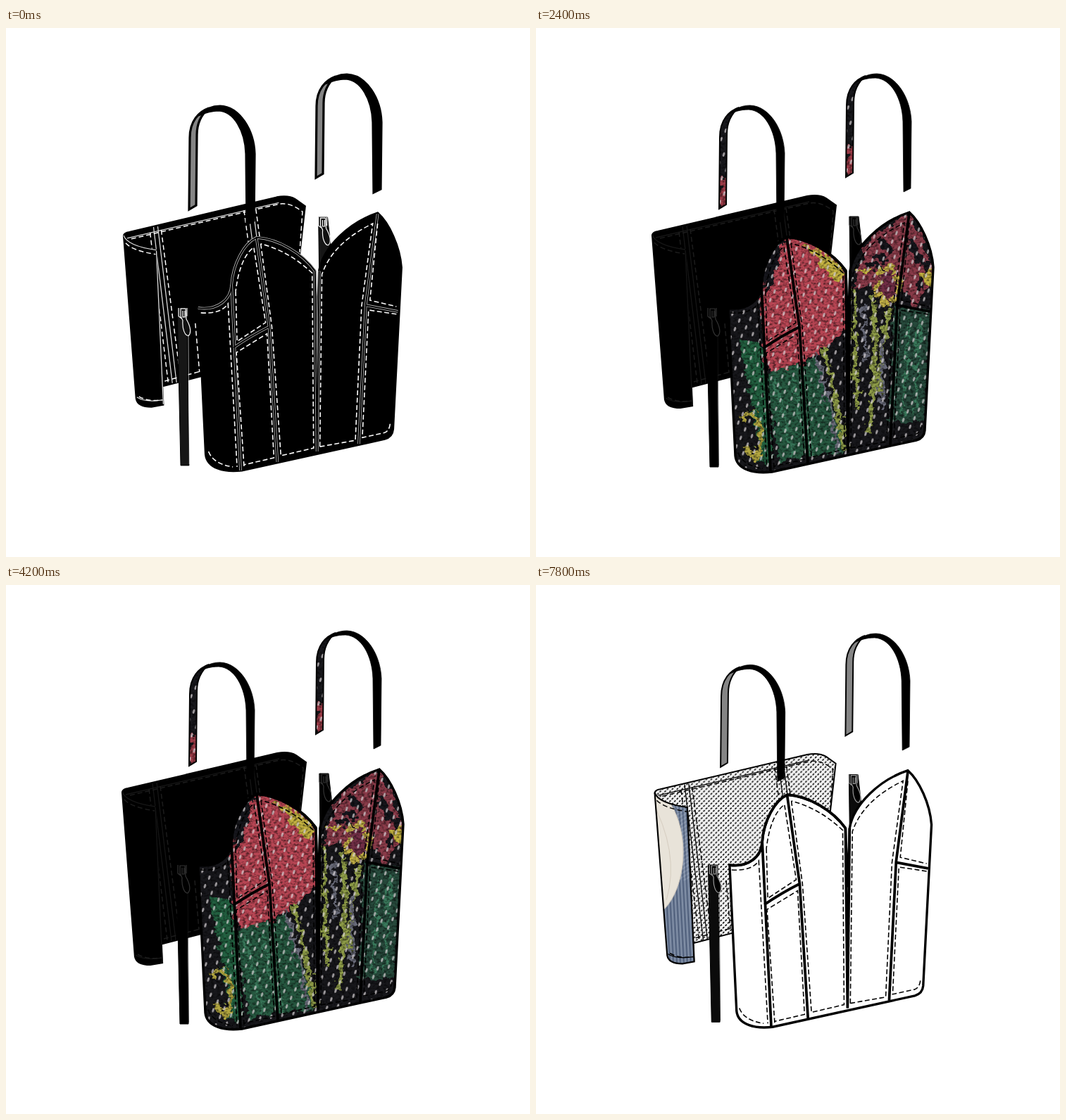
Write an HTML page that moves like this. It is 744 px wide and 752 px high and loops after 8 s.

```html
<!DOCTYPE html>
<html lang="en">
<head>
<meta charset="utf-8">
<title>Bag fabrics</title>
<style>
html, body { margin: 0; width: 100%; height: 100%; overflow: hidden; background: #fff; }
svg { display: block; width: 100vw; height: 100vh; }

/* Each scene shows for its share of the 8 s loop, offset by a negative delay. */
.scene { visibility: hidden; animation: show 8s step-end infinite; animation-delay: calc(var(--at) * 1ms - 8s); }
.long { animation-name: show-long; }
.short { animation-name: show-short; }
@keyframes show { 0% { visibility: visible } 7.5% { visibility: hidden } }
@keyframes show-long { 0% { visibility: visible } 15% { visibility: hidden } }
@keyframes show-short { 0% { visibility: visible } 2.5% { visibility: hidden } }

/* Looks */
.scene {
  --front: #fff; --back: #000; --side: #000; --strap: #858585;
  --stitch: #000; --edge: #000; --back-stitch: #484848; --back-edge: #333; --back-line: #000;
  --pull: #111; --pull-line: #fff; --tape: #0b0b0b; --strap-line: 1;
  --body-move: none; --strap-move: none;
}
.black {
  --front: #000; --stitch: #fff; --edge: #aaa; --back-stitch: #fff; --back-edge: #ddd; --strap-line: 4;
  --tape: #161616; --body-move: matrix(.988, 0, 0, .991, 4, 3.5); --strap-move: translate(0px, 1px);
}
.plain {
  --back: #fff; --side: #fff; --back-stitch: #000; --back-edge: #000;
  --pull: #000; --pull-line: #999;
  --body-move: matrix(.985, 0, 0, .988, 6, 4.8); --strap-move: matrix(.985, 0, 0, .988, 6, 4.8);
}
.dotted { --back: url(#dots); }
.floral { --front: url(#floral); --strap: url(#floral); --back-stitch: #1c1c1c; --back-edge: #161616; --pull: #000; --pull-line: #333; --tape: #000; }
.toile { --front: url(#toile); --strap: url(#strap-blue); --back-stitch: #555; --pull-line: #778; }
.knit { --front: url(#knit); }
.wave { --front: url(#wave); }

.body { transform: var(--body-move); }
.straps { transform: var(--strap-move); }
.front { fill: var(--front); stroke: #000; stroke-width: 3.4; }
.edge { fill: none; stroke: var(--edge); stroke-width: 3.8; }
.core { fill: none; stroke: #000; stroke-width: 2; }
.stitch { fill: none; stroke: var(--stitch); stroke-width: 1.6; stroke-dasharray: 7 3.6; }
.back { fill: var(--back); stroke: var(--back-line); stroke-width: 2; }
.side { fill: var(--side); stroke: var(--back-line); stroke-width: 2.2; }
.back-seam { fill: none; stroke: var(--back-edge); stroke-width: 1.3; }
.back-stitch { fill: none; stroke: var(--back-stitch); stroke-width: 1.5; stroke-dasharray: 7 4; }
.strap-face { fill: var(--strap); stroke: #000; stroke-width: calc(1.6px + var(--strap-line) * .4px); }
.strap-top { stroke: #000; stroke-width: calc(var(--strap-line) * .8px); }
.tape { fill: var(--tape); stroke: #000; }
.pull { fill: var(--pull); stroke: var(--pull-line); stroke-width: 1.2; }
</style>
</head>
<body>
<svg viewBox="0 0 744 752" preserveAspectRatio="none">
<defs>
  <filter id="rough" x="-10%" y="-10%" width="120%" height="120%">
    <feTurbulence type="fractalNoise" baseFrequency=".09" numOctaves="3" seed="4"/>
    <feDisplacementMap in="SourceGraphic" scale="20" xChannelSelector="R" yChannelSelector="G"/>
  </filter>
  <filter id="soft"><feGaussianBlur stdDeviation="7"/></filter>
  <filter id="grain" x="0" y="0" width="100%" height="100%">
    <feTurbulence type="fractalNoise" baseFrequency=".22 .32" numOctaves="2" seed="9"/>
    <feColorMatrix values="0 0 0 0 0  0 0 0 0 0  0 0 0 0 0  3 0 0 0 -1.25"/>
  </filter>

  <pattern id="dots" width="7" height="7" patternUnits="userSpaceOnUse">
    <path d="M0 0H7V7H0Z" fill="#f3f3f3"/>
    <path d="M.6 2.6L2.8.6M4.1 6.1L6.3 4.1" stroke="#000" stroke-width="1.5"/>
  </pattern>
  <pattern id="mesh" width="4" height="4" patternUnits="userSpaceOnUse">
    <path d="M0 0h1.5v1.5H0zM2 2h1.5v1.5H2z" fill="#2a2a3a" opacity=".38"/>
  </pattern>
  <pattern id="specks" width="16" height="22" patternUnits="userSpaceOnUse" patternTransform="rotate(-9)">
    <g fill="#d6d0d3" opacity=".75">
      <ellipse cx="4" cy="5" rx="1.5" ry="3.2" transform="rotate(24 4 5)"/>
      <ellipse cx="12" cy="16" rx="1.5" ry="3.2" transform="rotate(24 12 16)"/>
    </g>
  </pattern>
  <pattern id="loops" width="7" height="6" patternUnits="userSpaceOnUse" patternTransform="rotate(-4)">
    <path d="M0 1L3.5 4L7 1" fill="none" stroke="#222" stroke-width="1" opacity=".22"/>
  </pattern>
  <pattern id="rules" width="5" height="5" patternUnits="userSpaceOnUse" patternTransform="rotate(-3)">
    <path d="M1 0V5" stroke="#aab5c6" stroke-width="1.1"/>
    <path d="M3.6 0V5" stroke="#3d4c69" stroke-width="1"/>
  </pattern>
  <pattern id="slants" width="5" height="5" patternUnits="userSpaceOnUse" patternTransform="rotate(58)">
    <path d="M1 0V5" stroke="#9eabc0" stroke-width="1"/>
  </pattern>

  <linearGradient id="yarn" gradientUnits="userSpaceOnUse" x1="0" y1="304" x2="22" y2="544" spreadMethod="repeat">
    <stop offset="0" stop-color="#8fb9d5"/><stop offset=".06" stop-color="#8fb9d5"/>
    <stop offset=".09" stop-color="#5d5b64"/><stop offset=".21" stop-color="#66616a"/>
    <stop offset=".25" stop-color="#c0575b"/><stop offset=".38" stop-color="#c66062"/>
    <stop offset=".41" stop-color="#65606a"/><stop offset=".46" stop-color="#6d606a"/>
    <stop offset=".49" stop-color="#dca548"/><stop offset=".53" stop-color="#dd9d4a"/>
    <stop offset=".56" stop-color="#c65556"/><stop offset=".63" stop-color="#bd6265"/>
    <stop offset=".67" stop-color="#8dbcda"/><stop offset=".75" stop-color="#8dbcda"/>
    <stop offset=".78" stop-color="#5f6069"/><stop offset=".84" stop-color="#646570"/>
    <stop offset=".88" stop-color="#8fc0dd"/><stop offset=".94" stop-color="#8fb9d5"/>
    <stop offset=".98" stop-color="#aaa0a8"/>
  </linearGradient>
  <linearGradient id="strap-blue" x2="0" y2="1">
    <stop offset=".12" stop-color="#555"/><stop offset=".25" stop-color="#2f4961"/>
    <stop offset=".46" stop-color="#34475a"/><stop offset=".52" stop-color="#555"/>
  </linearGradient>
  <linearGradient id="sky" x2="0" y2="1">
    <stop offset="0" stop-color="#3f469b"/><stop offset=".45" stop-color="#7477a3"/><stop offset="1" stop-color="#8382a3"/>
  </linearGradient>

  <pattern id="knit" width="744" height="752" patternUnits="userSpaceOnUse">
    <rect width="744" height="752" fill="url(#yarn)"/>
    <rect width="744" height="752" fill="url(#loops)"/>
    <rect width="744" height="752" filter="url(#grain)" opacity=".2"/>
  </pattern>

  <pattern id="wave" width="744" height="752" patternUnits="userSpaceOnUse">
    <rect width="744" height="752" fill="#64748f"/>
    <rect width="744" height="420" fill="url(#slants)"/>
    <path d="M0 440L744 380V752H0Z" fill="#64748f"/>
    <rect width="744" height="752" fill="url(#rules)" opacity=".75"/>
    <g fill="#e8e3d9" stroke="#d3cabd">
      <ellipse cx="150" cy="380" rx="56" ry="95"/>
      <ellipse cx="365" cy="390" rx="75" ry="95"/>
      <path d="M158 300Q202 380 182 448" fill="none"/>
    </g>
  </pattern>

  <pattern id="floral" width="744" height="752" patternUnits="userSpaceOnUse">
    <rect width="744" height="752" fill="#17171b"/>
    <g filter="url(#rough)">
      <path d="M318 380L352 300L400 300L442 350V430L400 462L345 500L326 478Z" fill="#b74552"/>
      <path d="M322 350L342 312L350 318L330 382Z" fill="#18181c"/>
      <path d="M374 308Q420 316 442 352L424 362Q404 326 374 308Z" fill="#c3b141"/>
      <path d="M290 440L322 455L336 620L318 615Z" fill="#24603f"/>
      <path d="M324 492L400 472L438 600L345 615Z" fill="#28593f"/>
      <path d="M508 396L562 402L550 560L502 560Z" fill="#27493a"/>
      <path d="M470 300L530 262L566 345L540 400L515 360L452 372Z" fill="#8a3a48"/>
      <path d="M484 300l24 20M500 330l-20 -6M530 300l20 40M545 370l12 -40M470 335l26 8" stroke="#17171b" stroke-width="9"/>
      <ellipse cx="500" cy="366" rx="15" ry="24" fill="#6f2f45" stroke="#c0ae45" stroke-width="9" stroke-dasharray="12 3"/>
      <path d="M545 350L566 345V372ZM452 345h22" fill="#c3b141" stroke="#c3b141" stroke-width="4"/>
      <g fill="none" stroke="#8d9b46" stroke-width="7">
        <path d="M410 452Q424 520 438 600M450 372L456 540M478 380Q486 480 472 575M500 400L484 520"/>
        <path d="M292 555Q316 530 318 580T298 596" stroke="#b3a73f"/>
        <path d="M396 462Q420 540 428 600M493 440L490 540M466 395L468 470" stroke="#686a78" stroke-width="5"/>
        <path d="M340 500L365 610M362 495L392 605M530 410L520 555M545 410L538 550" stroke="#38785a" stroke-width="4"/>
      </g>
      <path d="M165 350Q220 310 225 390T170 430Z" fill="#b74552"/>
      <path d="M178 450L225 430V530H185Z" fill="#28593f"/>
      <path d="M205 300l8 60M195 430l8 100" stroke="#a3a945" stroke-width="7"/>
      <path d="M262 235h10v25h-10zM440 165h14v45h-14z" fill="#9c3b46"/>
    </g>
    <rect width="744" height="752" filter="url(#grain)" opacity=".5"/>
    <rect width="744" height="752" fill="url(#specks)"/>
  </pattern>

  <pattern id="toile" width="744" height="752" patternUnits="userSpaceOnUse">
    <rect width="744" height="752" fill="#85838f"/>
    <path d="M318 280H442V640H318Z" fill="url(#sky)"/>
    <path d="M442 280H488L498 420L500 620H442Z" fill="url(#sky)"/>
    <path d="M488 250H570V640H500L497 400Z" fill="#97939b"/>
    <path d="M260 390L320 380L328 640H270Z" fill="#777681"/>
    <g filter="url(#soft)">
      <path d="M280 540L330 500L380 630L285 635Z" fill="#62659d"/>
      <path d="M340 470Q385 440 420 470L445 600L365 625Z" fill="#a5a4ba"/>
      <path d="M380 445Q430 405 480 425T562 424" fill="none" stroke="#5d5c6b" stroke-width="12"/>
      <path d="M552 470L545 580L500 592" fill="none" stroke="#6d6a75" stroke-width="14"/>
    </g>
    <g filter="url(#rough)">
      <path d="M418 526H500V606H440Z" fill="#303891"/>
      <path d="M420 526l80 8" stroke="#999bb9" stroke-width="4"/>
      <ellipse cx="358" cy="325" rx="28" ry="20" fill="#a9abc6"/>
      <path d="M338 320l20 -12l10 14l-14 16zM372 316l12 8l-14 12z" fill="#303a86"/>
      <path d="M310 465Q322 425 372 425Q415 440 420 468" fill="none" stroke="#383f83" stroke-width="6"/>
      <path d="M332 402l16 4l8 22l22 8l-8 26h-40l8 -26zM345 462l22 4l8 44l-20 -8z" fill="#2f3880"/>
      <path d="M350 372l12 30M346 420l10 20" stroke="#30387e" stroke-width="5"/>
      <path d="M284 560l28 10l16 24l-26 26zM340 520l24 30l-4 50zM395 565l30 10l10 25l-36 12z" fill="#3c448f"/>
      <path d="M398 530l40 20l6 24l-36 -14zM290 525l30 -14l10 40l-28 10z" fill="#aaa9be"/>
      <path d="M170 330L225 300V400L180 430Z" fill="#50569c"/>
      <path d="M185 470L225 450V540H190Z" fill="#383f8d"/>
    </g>
    <path d="M382 334v14M376 341h12" stroke="#ccd" stroke-width="1.5"/>
    <rect width="744" height="752" fill="url(#mesh)"/>
  </pattern>

  <g id="strap">
    <path class="strap-face" d="M440 212L441 110C441 86 454 73 468 68C456 78 451 92 451 106L450 206Z"/>
    <path class="strap-top" d="M453 78C464 68 474 65 484 65C512 66 532 100 533 133L532 228L522 233L521 133C520 100 504 72 482 71C470 71 462 74 453 78Z"/>
  </g>
  <g id="pull" class="pull">
    <path d="M244 398V410L248 413M256 398V410" fill="none"/>
    <path d="M247 399H254L255 414C261 424 263 434 258 438C253 438 249 428 250 416L247 410Z"/>
    <path d="M250 402V411H253V402" fill="none"/>
  </g>
  <path id="seams" d="M320 365L333 631M356 298L374 425L386 619M323 455Q348 438 374 425M530 263L513 393L503 593M512 394L559 403M440 345L443 604M446 345L443 604"/>
  <path id="crest" d="M272 398C300 402 319 386 320 365C322 335 338 305 356 297C388 299 422 320 440 345"/>

  <g id="bag">
    <g class="body">
      <path class="back" d="M165 294Q166 290 173 289L385 239Q402 236 412 242L426 252L416 340L300 490L219 511Z"/>
      <path class="back-seam" d="M170 298L388 247M208 282L235 506M214 281L241 505M343 249L351 310M350 248L358 310"/>
      <path class="back-stitch" d="M176 299L388 249Q404 246 422 260L418 318M203 290L229 505M219 286L247 500M338 258L345 310M355 256L361 300M224 503L275 489M268 420L274 490"/>
      <path class="side" d="M165 294Q170 309 212 315L222 537L205 540Q185 540 183 528Z"/>
      <path class="back-seam" d="M212 316L222 536M184 526Q196 534 222 530M165 294Q170 309 212 315"/>
      <path class="back-stitch" d="M168 305Q178 316 211 321M187 525Q200 533 220 530"/>
      <path class="tape" d="M242 398H256L259 624H247Z"/>
      <path d="M258 430L259.500 622" stroke="var(--back-stitch)" stroke-width=".6"/>
      <use href="#pull"/>
      <path class="tape" d="M445 268H458L463 312L446 346Z"/>
      <use href="#pull" x="201" y="-130"/>
    </g>
    <g class="straps">
      <use href="#strap"/>
      <use href="#strap" x="-180" y="45"/>
    </g>
    <g class="body">
      <path class="front" d="M273 398C300 402 319 386 320 365C322 335 338 305 356 297C388 299 422 320 440 345L443 430L446 345C452 310 490 275 530 262C546 276 562 310 564 340L552 572Q551 583 540 586L335 631C310 634 285 628 283 608Z"/>
      <use href="#seams" class="edge"/>
      <use href="#crest" class="edge"/>
      <use href="#seams" class="core"/>
      <use href="#crest" class="core"/>
      <path class="stitch" d="M276 405Q305 407 315 392L328 626M287 604Q294 622 322 626
        M326 374L328 446L369 419L352 311Q332 326 326 374
        M338 625L327 462L371 435L381 613L338 623
        M362 306L378 425L391 610L438 599L436 348Q402 316 362 306
        M447 597L450 350Q465 305 523 277L507 395L498 588L447 597
        M530 277L519 387L557 396M557 407L517 401L508 584L540 577Q547 574 548 564"/>
    </g>
  </g>
</defs>

<rect width="744" height="752" fill="#fff"/>
<use href="#bag" class="scene long black" style="--at:0"/>
<use href="#bag" class="scene" style="--at:1200"/>
<use href="#bag" class="scene wave" style="--at:1800"/>
<use href="#bag" class="scene floral" style="--at:2400"/>
<use href="#bag" class="scene knit" style="--at:3000"/>
<use href="#bag" class="scene toile" style="--at:3600"/>
<use href="#bag" class="scene floral" style="--at:4200"/>
<use href="#bag" class="scene black" style="--at:4800"/>
<use href="#bag" class="scene plain" style="--at:5400"/>
<use href="#bag" class="scene plain dotted" style="--at:6000;--side:url(#knit)"/>
<use href="#bag" class="scene plain dotted" style="--at:6600;--side:url(#floral)"/>
<use href="#bag" class="scene plain dotted" style="--at:7200;--side:url(#toile)"/>
<use href="#bag" class="scene short plain dotted" style="--at:7800;--side:url(#wave)"/>
</svg>
</body>
</html>
```
